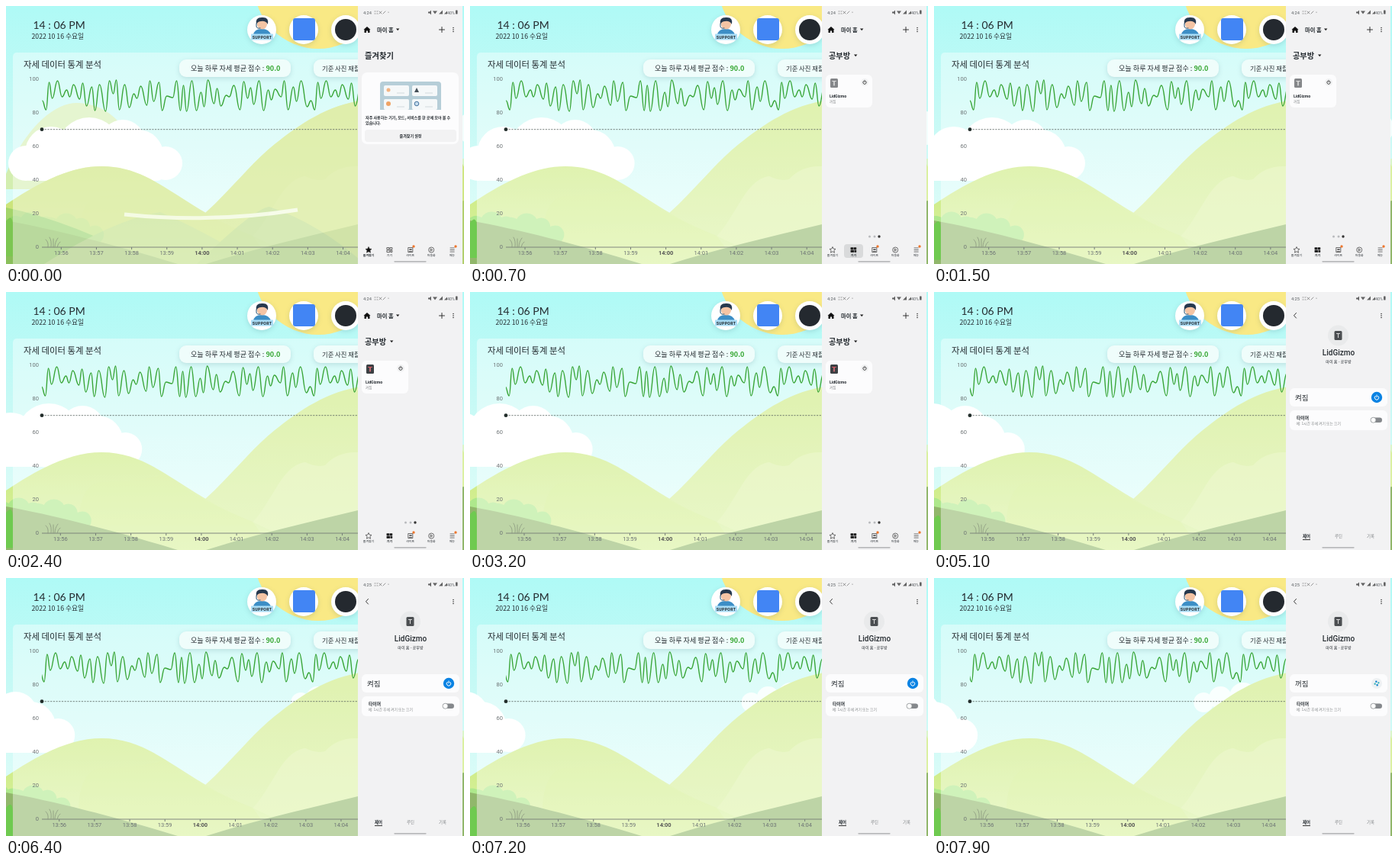
Recreate the animation shown at these times as an HTML page. Size 600 by 338 pixels, loop 8000 ms.

```html
<!DOCTYPE html>
<html>
<head>
<meta charset="utf-8">
<title>Posture dashboard</title>
<style>
html, body { margin: 0; width: 100%; height: 100%; overflow: hidden; background: #b2fbf7; }
svg { display: block; width: 100vw; height: 100vh; }
text { font-family: "Noto Sans CJK KR", "Noto Sans CJK", "Noto Sans", sans-serif; fill: #252b30; }
.latin { font-family: Roboto, sans-serif; }
.mid { text-anchor: middle; }
.end { text-anchor: end; }
.b { font-weight: 700; }
.m { font-weight: 500; }
.axis text { font: 7.5px Roboto, sans-serif; fill: #6c7274; }
.axis .b { font-weight: 700; fill: #555; }
.line { fill: none; stroke: #222; stroke-linecap: round; stroke-linejoin: round; }
.soft { filter: drop-shadow(0 2px 3px #00304022); }
.dim { fill: #85888a; }
.card { fill: #fcfcfd; }
</style>
</head>
<body>
<svg viewBox="0 0 600 338" preserveAspectRatio="none">
  <defs>
    <linearGradient id="sky" x2="0" y2="1">
      <stop stop-color="#affaf6"/><stop offset=".4" stop-color="#c5f9f5"/><stop offset="1" stop-color="#e6fdf9"/>
    </linearGradient>
    <linearGradient id="far" x2="0" y2="1">
      <stop stop-color="#c9e87a"/><stop offset="1" stop-color="#daf1a6"/>
    </linearGradient>
    <linearGradient id="near" x2="0" y2="1">
      <stop stop-color="#c9e97a"/><stop offset="1" stop-color="#dcf3aa"/>
    </linearGradient>
    <clipPath id="plot"><path d="M47 88H461V160H47Z"/></clipPath>
    <clipPath id="axisClip"><path d="M47 314H461V332H47Z"/></clipPath>
    <path id="farHill" d="M225 300C280 262 315 210 352 181C385 155 420 130 470 123C560 120 600 170 640 338H225Z"/>
    <path id="nearHill" d="M0 260C45 230 85 210 125 210C195 210 225 262 323 301L400 338H0Z"/>
    <g id="bush">
      <path d="M0 40V18a13 13 0 0 1 20-9a15 15 0 0 1 26 0a12 12 0 0 1 18 10a12 12 0 0 1 12 21Z"/>
    </g>
    <g id="device">
      <rect x="-5" y="-6" width="10" height="12" rx="1.5"/>
      <path d="M-2.4-2.5H2.4M0-2.5V3" stroke="#ddd" fill="none"/>
    </g>
    <g id="menu" fill="#333">
      <circle cx="586" cy="28.5" r=".8"/><circle cx="586" cy="31" r=".8"/><circle cx="586" cy="33.5" r=".8"/>
    </g>
    <g id="power" fill="none" stroke-width=".8" stroke-linecap="round">
      <path d="M-1.4-1.6A2.2 2.2 0 1 0 1.4-1.6M0-2.7V-.4"/>
    </g>
  </defs>

  <!-- landscape -->
  <rect width="600" height="338" fill="url(#sky)"/>
  <circle cx="409" cy="-28" r="84" fill="#f9e985"/>
  <path id="oldHill" d="M0 220C30 150 70 125 95 127C140 130 165 160 190 240H0Z" fill="#d3eeb0"/>
  <g id="cloud" fill="#fff">
    <circle cx="-22" cy="206" r="22"/><circle cx="-58" cy="195" r="33"/>
    <circle cx="-78" cy="178" r="29"/><circle cx="-122" cy="188" r="42"/>
    <circle cx="-172" cy="192" r="34"/><circle cx="-205" cy="206" r="23"/>
    <rect x="-210" y="200" width="188" height="29" rx="12"/>
  </g>
  <g id="cloud2" fill="#f4fffd">
    <circle cx="14" cy="163" r="13"/><circle cx="36" cy="157" r="15"/>
    <circle cx="66" cy="155" r="18"/><circle cx="100" cy="160" r="22"/>
  </g>
  <use href="#farHill" fill="url(#far)"/>
  <path d="M323 302C348 276 362 226 392 223Q406 230 418 227Q434 209 461 210L600 200V338H323Z" fill="#e2f4ae" opacity=".6"/>
  <use href="#nearHill" fill="url(#near)"/>
  <path d="M95 300Q98 251 125 249C165 247 190 246 206 238Q245 270 323 301L350 338H95Z" fill="#cdea80" opacity=".35"/>
  <g id="bushes" fill="#aee88c"><use href="#bush" x="0" y="268"/><use href="#bush" x="46" y="270"/><use href="#bush" x="-62" y="264"/></g>
  <g fill="#91b76b">
    <path d="M0 281C60 292 140 312 225 338H0Z"/>
    <path d="M262 338C325 318 395 302 461 286L600 255V338Z"/>
  </g>
  <path id="edge" d="M0 292Q9 280 9 300V338H0Z" fill="#6fca50"/>
  <g id="ghost">
    <use href="#farHill" fill="#c9df70"/><use href="#nearHill" fill="#c9df70"/>
    <path d="M0 264Q90 283 190 338H0Z" fill="#86c552"/>
    <path d="M50 338Q140 280 202 270Q260 295 330 338Z" fill="#b2d478"/>
    <path d="M250 338Q325 265 345 263Q410 285 470 338Z" fill="#a7cd70"/>
    <path d="M155 273Q270 285 382 267" fill="none" stroke="#fff" stroke-width="5"/>
  </g>

  <!-- dashboard -->
  <rect x="9" y="61" width="589" height="290" rx="5" fill="#fff" opacity=".4"/>
  <text x="35.5" y="30" font-size="14" style="font-family:Lato,sans-serif">14 : 06 PM</text>
  <text x="33.5" y="43" font-size="8.7">2022 10 16 수요일</text>
  <g class="soft" fill="#fff">
    <circle cx="335" cy="31" r="19"/><circle cx="390" cy="31" r="19"/><circle cx="445" cy="31" r="19"/>
  </g>
  <path d="M324 38Q325 30 335 30T347 38Z" fill="#3c8ec6"/>
  <circle cx="335.5" cy="24" r="6.5" fill="#f4c4a4"/>
  <path d="M328 24Q326 15 335 15Q345 14 343 24Q340 19 334 20Q330 20 328 24Z" fill="#26394e"/>
  <path class="line" d="M328 23V27Q329 30 333 29" style="stroke:#27516f"/>
  <rect x="321" y="36.5" width="29" height="8" rx="1" fill="#a9dcf5"/>
  <text class="mid b latin" x="335.5" y="42.5" font-size="5.2" letter-spacing=".35">SUPPORT</text>
  <rect x="376" y="16" width="29" height="29" rx="3" fill="#4285f4"/>
  <circle cx="445" cy="31" r="14" fill="#24292f"/>

  <text class="m" x="23" y="80.5" font-size="11.4">자세 데이터 통계 분석</text>
  <g class="soft" fill="#effdfb">
    <rect x="227" y="70" width="146" height="23" rx="9"/><rect x="403" y="70" width="100" height="23" rx="9"/>
  </g>
  <text x="242" y="85" font-size="9.1">오늘 하루 자세 평균 점수 : <tspan class="b" fill="#32a52e">90.0</tspan></text>
  <text x="414" y="84.5" font-size="8.3">기준 사진 재촬영</text>

  <g class="axis" id="yAxis"></g>
  <path d="M47 316H461" stroke="#747c78" stroke-width=".9"/>
  <g clip-path="url(#axisClip)"><g class="axis" id="xAxis"></g></g>
  <path d="M47 161.7H461" stroke="#59635f" stroke-width=".8" stroke-dasharray="2.2 1.5"/>
  <circle cx="47" cy="161.7" r="2.4" fill="#222d2a"/>
  <g clip-path="url(#plot)"><path id="curve" fill="none" stroke="#38a536" stroke-width="1.4"/></g>
  <path class="line" d="M55 316Q56 309 52 306M59 316Q60 307 57 303M62 316V305M64 316Q64 309 68 304M67 316Q68 311 71 309" style="stroke:#8c987f;stroke-width:.8"/>

  <!-- phone -->
  <rect x="461" width="137" height="338" fill="#f2f2f3"/>
  <g opacity=".75">
    <text id="clock" class="latin" x="468" y="10.5" font-size="5.7"></text>
    <path class="line" d="M483 7h1m2 0h1m-4 3h1m2 0h1M489 10l3-3m-3 0 3 3M494 10l3-3M501 8v.5" stroke-width=".6"/>
    <path d="M553 7.5h2l2-2v6l-2-2h-2ZM559 6.5h6l-3 4ZM567 10.5l5-5v5ZM574 10.5l4-4v4Z" fill="#333"/>
    <text class="latin end" x="588" y="10.5" font-size="5.4">40%</text>
    <rect x="589" y="5.5" width="2.6" height="5" rx=".6" fill="#333"/>
  </g>
  <path d="M509 334.8H550" stroke="#a5a6a8" stroke-width="1.3" stroke-linecap="round"/>

  <g id="home">
    <use href="#menu"/>
    <path d="M468.5 31l4.5-4 4.5 4h-1v4h-2.5v-2.5h-2v2.5h-2.5v-4Z" fill="#111"/>
    <text class="b" x="486" y="33.5" font-size="7.3">마이 홈</text>
    <path d="M511 29.5h4.4l-2.2 2.8Z" fill="#222"/>
    <path class="line" d="M567.5 31h7M571 27.5v7" stroke-width=".9"/>
    <g id="favorites">
      <text class="b" x="470" y="68.5" font-size="10.3">즐겨찾기</text>
      <rect class="card" x="466" y="87" width="127" height="94" rx="7"/>
      <path d="M490 136V103q0-4 4-4h72q4 0 4 4v33Z" fill="#b6ced8"/>
      <g fill="#f5f8f9">
        <rect x="495" y="104" width="33" height="14" rx="2"/><rect x="532" y="104" width="33" height="14" rx="2"/>
        <rect x="495" y="122" width="33" height="14" rx="2"/><rect x="532" y="122" width="33" height="14" rx="2"/>
      </g>
      <circle cx="501" cy="110" r="2.5" fill="#f2b483"/><path d="M535 113l3-6 3 6Z" fill="#444e57"/>
      <circle cx="501" cy="128" r="3" fill="#efa365"/><circle cx="538" cy="128" r="2.8" fill="#c6dced" stroke="#47749f"/>
      <path d="M512 114h10m27 0h10m-47 18h10m27 0h10" stroke="#d2dadd"/>
      <g class="b" font-size="5.05">
        <text x="471" y="147.5">자주 사용하는 기기, 모드, 서비스를 한 곳에 모아 볼 수</text>
        <text x="471" y="154.5">있습니다.</text>
        <rect x="470" y="162" width="120" height="16" rx="4" fill="#f2f2f3"/>
        <text class="mid" x="530" y="171.5">즐겨찾기 설정</text>
      </g>
    </g>
    <g id="devices">
      <text class="b" x="470" y="68.5" font-size="10.2">공부방</text>
      <path d="M503 63.5h4.4l-2.2 2.8Z" fill="#222"/>
      <rect class="card" x="466" y="90" width="61" height="43" rx="6"/>
      <use id="tileIcon" href="#device" x="477" y="101"/>
      <path id="tileMark" d="M474.5 98.5h5m-2.5 0v6" fill="none" stroke-width="1.2"/>
      <circle cx="517" cy="100" r="5" fill="#f1f2f3"/>
      <use href="#power" x="517" y="100" stroke="#222"/>
      <text class="b latin" x="471" y="119.5" font-size="5.2">LidGizmo</text>
      <text class="dim" id="tileState" x="471" y="126.5" font-size="4.5"></text>
      <g fill="#b8babd"><circle cx="523.5" cy="302" r="1.5"/><circle cx="530" cy="302" r="1.5"/><circle cx="536" cy="302" r="1.7" fill="#333"/></g>
    </g>
    <rect id="press" x="490" y="312" width="25" height="18" rx="4" fill="#d9dadb"/>
    <g id="tabs"></g>
    <circle cx="534" cy="315" r="1.7" fill="#ed762d"/><circle cx="589" cy="315" r="1.7" fill="#ed762d"/>
  </g>

  <g id="detail">
    <circle cx="529.5" cy="57" r="13.5" fill="#e9eaeb"/>
    <text class="mid latin m" x="530" y="83" font-size="10">LidGizmo</text>
    <text class="mid" x="530" y="93" font-size="5.1">마이 홈 - 공부방</text>
    <g font-size="5.4" class="mid">
      <text class="b" x="488" y="322">제어</text><text class="dim" x="530" y="322">루틴</text><text class="dim" x="572" y="322">기록</text>
    </g>
    <path d="M483 324.5H493" stroke="#222" stroke-width=".9"/>
    <g id="controls">
      <use href="#menu"/>
      <path class="line" d="M474.5 27.5l-3 3.3 3 3.3" stroke-width=".9"/>
      <use href="#device" x="529.5" y="57" fill="#4b4e51"/>
      <rect class="card" x="466" y="126" width="128" height="24" rx="6"/>
      <text id="state" x="473" y="141.5" font-size="9.5"></text>
      <g id="onButton"><circle cx="580" cy="138" r="7.2" fill="#0b83e3"/><use href="#power" transform="translate(580 138.3) scale(1.25)" stroke="#fff"/></g>
      <g id="busy"><circle cx="580" cy="138" r="7" fill="#eef1f3"/><g id="dots"></g></g>
      <rect class="card" x="466" y="155" width="128" height="26" rx="6"/>
      <text class="b" x="475" y="167" font-size="5.8">타이머</text>
      <text class="dim" x="474.5" y="174" font-size="4.85">예: 1시간 후에 켜기 또는 끄기</text>
      <rect x="572" y="164.5" width="15" height="6.5" rx="3.25" fill="#85888c"/><circle cx="575.5" cy="167.75" r="3.5" fill="#fff" stroke="#85888c" stroke-width=".7"/>
    </g>
  </g>
</svg>
<script>
const LOOP = 8000, STEP = 100;
const $ = id => document.getElementById(id);
const clamp = v => Math.max(0, Math.min(1, v));
const ramp = (t, from, to) => clamp((t - from) / (to - from));
const show = (id, on) => $(id).setAttribute('opacity', +on);
const move = (id, x, y = 0) => $(id).setAttribute('transform', `translate(${x} ${y})`);

function add(parent, tag, attrs, label = '') {
  const node = document.createElementNS('http://www.w3.org/2000/svg', tag);
  for (const key in attrs) node.setAttribute(key, attrs[key]);
  node.textContent = label;
  return $(parent).appendChild(node);
}

for (let v = 0; v <= 100; v += 20)
  add('yAxis', 'text', { x: 43, y: 318 - v * 2.2, class: 'end' }, v);

for (let i = 0; i < 10; i++) {
  const x = 72.3 + i * 46.15, minute = 56 + i;
  const label = `${minute < 60 ? 13 : 14}:${String(minute % 60).padStart(2, '0')}`;
  add('xAxis', 'path', { d: `M${x} 316v3`, stroke: '#747c78' });
  add('xAxis', 'text', { x, y: 326, class: minute === 60 ? 'mid b' : 'mid' }, label);
}

// Turning points of the score: horizontal gaps and heights.
const gaps = [5, 5, 4, 4, 7, 6, 6, 4, 5, 8, 4, 5, 7, 4, 6, 8];
const heights = [124, 136, 100, 121, 98, 119, 110, 119, 103, 122, 101, 131, 106, 137, 103, 138,
  98, 115, 97, 136, 103, 133, 115, 121, 105, 130, 98, 125, 100, 137, 118, 120,
  98, 137, 104, 138, 98, 137, 113, 132, 97, 128, 108, 131, 117, 119, 104, 136,
  99, 121, 107, 129, 98, 137, 110, 123, 109, 119, 98, 136, 106, 125, 98, 132];
let path = 'M47.5 124', px = 47.5, py = 124;
for (let i = 1; px < 475; i++) {
  const x = px + gaps[i % gaps.length], y = heights[i % heights.length], bend = (x - px) * 0.48;
  path += `C${px + bend} ${py} ${x - bend} ${y} ${x} ${y}`;
  px = x; py = y;
}
$('curve').setAttribute('d', path);

const icons = [
  'M0-4l1.2 2.6 2.8.3-2.1 1.9.6 2.8-2.5-1.4-2.5 1.4.6-2.8-2.1-1.9 2.8-.3Z',
  'M-3.5-3h3v2.5h-3ZM.5-3h3v2.5h-3ZM-3.5.5h4v2.5h-4ZM1.5.5h2v2.5h-2Z',
  'M-3-3h6v6h-6ZM-1.5-1h3v1h-3M-2 2h4',
  'M-3.5 0a3.5 3.5 0 1 1 7 0a3.5 3.5 0 1 1-7 0M-1-1.6l2.6 1.6-2.6 1.6Z',
  'M-3-2.5h6M-3 0h6M-3 2.5h6'
];
const tabs = ['즐겨찾기', '기기', '라이프', '자동화', '메뉴'].map((label, i) => {
  const x = 475 + i * 27.4;
  const icon = add('tabs', 'path', { d: icons[i], transform: `translate(${x} 319.5)`, stroke: '#333', 'stroke-width': 0.7 });
  const text = add('tabs', 'text', { x, y: 328, class: 'mid', 'font-size': 3.9 }, label);
  return { icon, text };
});

for (let i = 0; i < 4; i++) {
  const a = i * Math.PI / 2;
  add('dots', 'circle', { cx: 2.4 * Math.cos(a), cy: 2.4 * Math.sin(a), r: 1.25, fill: i % 2 ? '#1585cf' : '#42b7bc' });
}

function render(t) {
  const s = t / 1000;
  const first = t < 400, on = t >= 1700, detail = t >= 3700, off = t >= 7500;

  move('cloud', 231 - 22 * s);
  move('cloud2', 513 - 22 * s);
  move('bushes', -6.8 * s);
  move('edge', 0, -10 + 3 * s);
  move('xAxis', -0.4 * s);
  move('curve', -0.4 * s);
  const old = 1 - ramp(t, 0, 400);
  show('ghost', old * 0.6);
  show('oldHill', old);

  $('clock').textContent = t < 3500 ? '4:24' : '4:25';
  show('home', !detail);
  show('favorites', first);
  show('devices', !first);
  show('press', first ? 0 : 1 - ramp(t, 800, 1100));
  tabs.forEach(({ icon, text }, i) => {
    const active = i === (first ? 0 : 1);
    icon.setAttribute('fill', active ? '#111' : 'none');
    text.setAttribute('font-weight', active ? 700 : 400);
  });
  $('tileIcon').setAttribute('fill', on ? '#3c4044' : '#85878a');
  $('tileMark').setAttribute('stroke', on ? '#e0525d' : '#ddd');
  $('tileState').textContent = on ? '켜짐' : '꺼짐';

  show('detail', detail);
  show('controls', ramp(t, 3900, 4300));
  $('state').textContent = off ? '꺼짐' : '켜짐';
  show('onButton', !off);
  show('busy', off);
  $('dots').setAttribute('transform', `translate(580 138) rotate(${t * 0.36 + 20})`);
}

function frame(now) {
  render(Math.floor(now % LOOP / STEP) * STEP);
  requestAnimationFrame(frame);
}
render(0);
requestAnimationFrame(frame);
</script>
</body>
</html>
```
